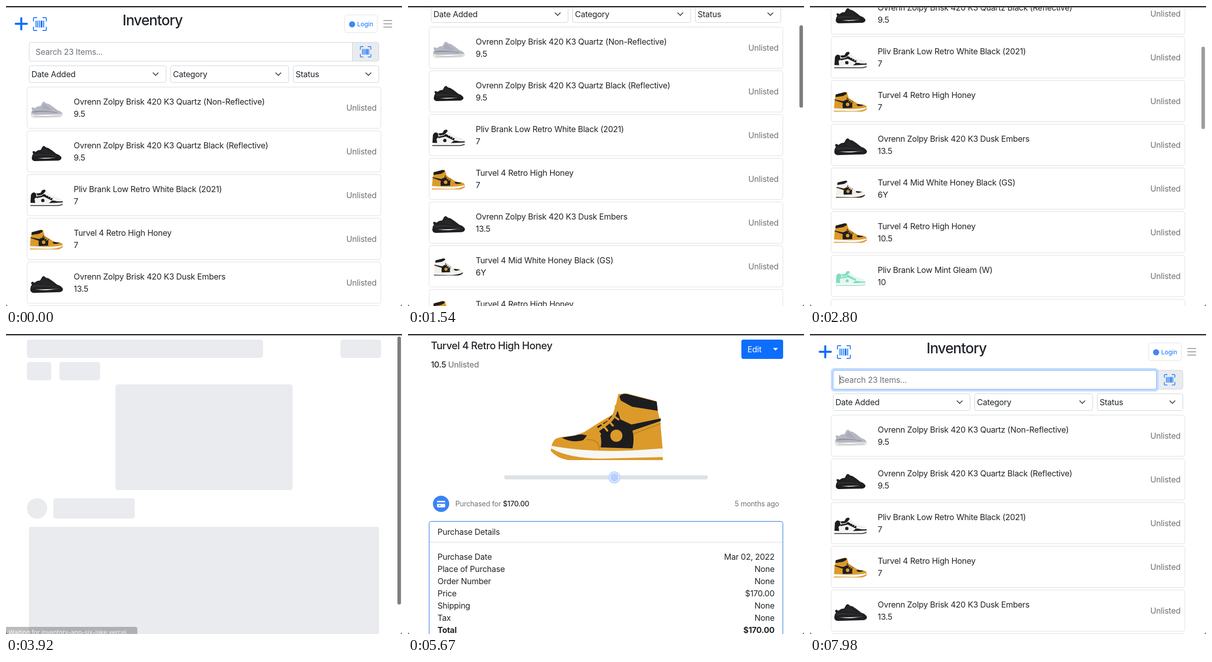
An HTML page for the animation above (8000 ms loop, 778 by 590 pixels).

```html
<!DOCTYPE html>
<html lang="en">
<head>
<meta charset="utf-8">
<title>Inventory</title>
<style>
html, body { margin: 0; width: 100%; height: 100%; overflow: hidden; background: #fff; }
svg { display: block; }
text { font: 400 16px Inter, "Liberation Sans", sans-serif; font-optical-sizing: none; letter-spacing: -.017em; fill: #212529; white-space: pre; }
.end { text-anchor: end; }
.gray { fill: #6f7378; }
.mid { font-weight: 500; }
.bold { font-weight: 700; }
.title { font-size: 28px; font-weight: 500; letter-spacing: -.035em; }
.head { font-size: 20px; font-weight: 500; letter-spacing: -.025em; }
.small { font-size: 14px; }
.tiny { font-size: 12px; letter-spacing: 0; }
.link { fill: #0d6efd; }
.white { fill: #fff; }
</style>
</head>
<body>
<svg id="stage" width="778" height="590" viewBox="0 0 778 590"></svg>
<script>
const LOOP = 8000, STEP = 70, BLUE = '#0d6efd';
const INK = '#1d1d20', GOLD = '#dc9a2a', MINT = '#7fdcc0';

const text = (x, y, s, cls = '') => `<text x="${x}" y="${y}" class="${cls}">${s}</text>`;
const box = (x, y, w, h, r, fill, stroke = 'none') =>
  `<rect x="${x}" y="${y}" width="${w}" height="${h}" rx="${r}" fill="${fill}" stroke="${stroke}"/>`;
const frame = (x, y, w, h, r, stroke, fill = '#fff') => box(x + .5, y + .5, w - 1, h - 1, r, fill, stroke);
const shape = (d, fill) => `<path d="${d}" fill="${fill}"/>`;
const line = (d, stroke, width) =>
  `<path d="${d}" fill="none" stroke="${stroke}" stroke-width="${width}" stroke-linecap="round" stroke-linejoin="round"/>`;
const place = (x, y, k, body) => `<g transform="translate(${x} ${y}) scale(${k})">${body}</g>`;

// Shoes, toe to the right. High is 222 x 132, low and runner are 200 wide.
const high = (main, collar, panel, sole, dot) =>
  shape('M88 2L71 1L13 16L10 35L5 56L0 114L171 119L221 107Q219 95 212 90Q205 86 176 84L156 77L129 60L99 42L93 24Z', main) +
  shape('M86 7Q80 0 71 2L12 17L10 35L61 27L83 15Z', collar) +
  shape('M97 40L89 36L84 52L62 62L4 50L4 55L60 74Q56 92 60 109L123 107Q119 88 130 66L112 56Z', panel) +
  shape('M150 84Q160 79 176 84L200 88Q180 99 158 93Z', panel) +
  line('M92 26Q92 46 110 60L150 88', main, 6) +
  line('M99 44L88 52M110 52L99 64M121 60L110 74M135 68L124 81M149 76L138 88', main, 4) +
  line('M3 60L58 80L61 108M150 92Q128 90 125 110', '#0003', 1.5) +
  `<circle cx="92" cy="84" r="12" fill="${dot}"/>` +
  shape('M0 109L60 113Q150 117 220 104L222 112Q205 126 188 130L0 130Z', '#f7f6f3') +
  shape('M0 126L120 129Q185 129 221 109L222 114Q210 128 188 132L0 132Z', sole);

const low = (base, over, outsole, dot) =>
  shape('M6 34Q10 20 24 17L46 24L64 20L74 4L88 0L98 10L134 38L164 48Q192 54 198 72L196 86L4 86Z', base) +
  shape('M6 34Q10 20 24 17L36 22L40 46L28 56L32 84L3 84Z', over) +
  shape('M38 24L64 21L74 4L88 0L96 8L84 22L72 32L46 36Z', over) +
  shape('M84 26L138 54L132 66L84 42L40 52L40 42L72 36Z', over) +
  shape('M112 84L134 66L150 68Q170 74 198 70L198 84Z', over) +
  line('M98 16L88 26M110 25L100 36M122 34L112 45M134 42L124 53', base, 4) +
  `<circle cx="78" cy="66" r="10" fill="${dot}"/>` +
  shape('M2 80Q100 86 199 78L198 94L170 98L2 98Z', '#f6f6f4') +
  line('M4 97L172 97L196 91', outsole, 5);

const runner = (main, shade, sole) =>
  shape('M6 82Q0 66 12 54L6 40L16 34L26 41L44 30L62 27L74 5L84 0L98 11L112 14L136 30L166 53Q192 60 199 78Z', main) +
  shape('M14 60Q70 50 134 62L166 66L160 70Q90 58 16 68Z', shade) +
  line('M82 18L100 26M74 28L112 38M72 38L126 50', shade, 3) +
  shape('M3 74Q60 90 120 84Q170 76 199 76Q203 92 180 98L20 102Q-2 98 3 74Z', sole) +
  line('M24 90Q110 96 184 87', shade, 2);

const pollen = high(GOLD, INK, INK, GOLD, GOLD);
const items = [
  ['Ovrenn Zolpy Brisk 420 K3 Quartz (Non-Reflective)', '9.5', place(48, 29, .32, runner('#b5b8c2', '#8f94a4', '#e6e5e3'))],
  ['Ovrenn Zolpy Brisk 420 K3 Quartz Black (Reflective)', '9.5', place(50, 30, .295, runner('#202022', '#303034', '#1b1b1d'))],
  ['Pliv Brank Low Retro White Black (2021)', '7', place(47, 30, .325, low('#f1f1ef', INK, INK, INK))],
  ['Turvel 4 Retro High Honey', '7', place(47, 23, .293, pollen)],
  ['Ovrenn Zolpy Brisk 420 K3 Dusk Embers', '13.5', place(47, 28, .325, runner('#222225', '#323236', '#1d1d20'))],
  ['Turvel 4 Mid White Honey Black (GS)', '6Y', place(51, 25, .257, high('#f2efe8', INK, INK, '#2b2926', GOLD))],
  ['Turvel 4 Retro High Honey', '10.5', place(47, 23, .293, pollen)],
  ['Pliv Brank Low Mint Gleam (W)', '10', place(50, 31, .295, low('#e4f7f1', MINT, MINT, MINT))]
];

const card = ([name, size, shoe], i) => `<g transform="translate(0 ${159 + 86 * i})">` +
  frame(41, 0, 696, 82, 4, '#dfdfdf') + shoe +
  text(133, 35, name) + text(133, 59, size) + text(728, 47, 'Unlisted', 'gray end') + '</g>';

const scanIcon = (x, y, k) => {
  const corner = [0, 90, 180, 270].map(a =>
    `<g transform="rotate(${a} 8 8)">${line('M.5 4.5V1.5a1 1 0 0 1 1-1h3', BLUE, 1)}</g>`).join('');
  const bars = [[3, 1], [5, 1], [7, 1], [9, 2], [12, 1]].map(([bx, w]) => box(bx, 4, w, 8, 0, BLUE)).join('');
  return place(x, y, k, corner + bars);
};

const select = (x, w, label, arrow) => frame(x, 117, w, 34, 4, '#ced4da') + text(x + 5, 140, label) +
  line(`M${arrow - 5} 131.5l5 5l5 -5`, '#343a40', 1.7);

const listPage = () =>
  line('M19 35H41M30 24V46', BLUE, 4) + scanIcon(53, 22, 1.6875) +
  text(229, 38, 'Inventory', 'title') +
  frame(665, 17, 65, 36, 5, '#dee2e6') + '<circle cx="680" cy="36" r="6" fill="#4285f4"/>' +
  text(690, 40, 'Login', 'tiny link') +
  line('M742 28.5H758M742 35H758M742 41.5H758', '#8a8a8a', 1.6) +
  frame(45, 71, 688, 38, 4, '#ced4da', '#e9ecef') + scanIcon(695.5, 79, 1.375) +
  '<path d="M49.5 71.5H680.5V108.5H49.5Q45.5 108.5 45.5 104.5V75.5Q45.5 71.5 49.5 71.5Z" fill="#fff" stroke="#ced4da"/>' +
  '<g id="focus"><rect x="43" y="69" width="640" height="42" rx="5" fill="none" stroke="#c2dbfe" stroke-width="4"/>' +
  frame(45, 71, 636, 38, 4, '#86b7fe', 'none') + '</g>' +
  text(58, 96, 'Search 23 Items...', 'gray') + '<path id="caret" d="M58.5 81V99" stroke="#212529"/>' +
  select(45, 270, 'Date Added', 294) + select(323, 233, 'Category', 535) + select(564, 169, 'Status', 712) +
  items.map(card).join('') + frame(41, 159 + 86 * items.length, 696, 82, 4, '#dfdfdf');

const skeleton = () => [
  [41, 11, 464, 36], [657, 11, 80, 36], [41, 55, 48, 36], [105, 55, 80, 36], [215, 99, 348, 208],
  [41, 323, 40, 40, 20], [93, 323, 160, 40], [45, 379, 688, 230]
].map(([x, y, w, h, r = 5]) => box(x, y, w, h, r, '#eaebef')).join('');

const rows = [['Purchase Date', 'Mar 02, 2022'], ['Place of Purchase', 'None'], ['Order Number', 'None'],
  ['Price', '$170.00'], ['Shipping', 'None'], ['Tax', 'None'], ['Total', '$170.00']];

const detailPage = () =>
  text(45, 30, 'Turvel 4 Retro High Honey', 'head') +
  box(655, 11, 82, 38, 4, BLUE) + text(667, 36, 'Edit', 'white') + shape('M717 27.5H727L722 32.5Z', '#fff') +
  text(45, 66, '10.5 <tspan fill="#7b7f84">Unlisted</tspan>', 'mid') +
  `<g id="shoe">${place(-111, 0, 1, pollen)}</g>` +
  box(189, 278, 400, 8, 4, '#dee2e6') +
  '<g id="thumb"><circle id="ring" r="12" fill="#c2dbfe"/><circle r="9" fill="#fff"/><circle id="knob" r="8"/></g>' +
  '<circle cx="65" cy="334" r="16" fill="#3b82f6"/>' +
  box(57, 328, 16, 13, 2, '#fff') + box(57, 331, 16, 3, 0, '#3b82f6') + box(60, 336.5, 4, 1.6, .5, '#3b82f6') +
  text(93, 339, 'Purchased for <tspan fill="#212529" font-weight="500">$170.00</tspan>', 'small gray') +
  text(729, 339, '5 months ago', 'small gray end') +
  frame(41, 368, 696, 260, 4, '#1c73dc') + text(58, 395, 'Purchase Details') +
  '<path d="M42 409.5H736" stroke="#dcdcdc"/>' +
  rows.map(([a, b], i) => {
    const cls = a === 'Total' ? 'bold' : '';
    return text(58, 444 + 24 * i, a, cls) + text(720, 444 + 24 * i, b, cls + ' end');
  }).join('');

const stage = document.getElementById('stage');
stage.innerHTML = box(0, 0, 778, 590, 0, '#fff') +
  `<g id="list">${listPage()}</g><g id="skeleton">${skeleton()}</g><g id="detail">${detailPage()}</g>` +
  '<rect id="bar" x="769" width="7" rx="3.5" fill="#7f7f7f"/>' +
  `<g id="status">${box(-5, 576, 263, 30, 4, '#67686b')}${text(5, 591, 'Waiting for inventory-app-six-lake.vercel....', 'tiny white')}</g>` +
  box(0, 0, 778, 2, 0, '#323135') + box(0, 2, 778, 1, 0, '#77767a') +
  shape('M0 586Q.5 589.5 4 590H0ZM778 586Q777.5 589.5 774 590H778Z', '#3a393d');

const el = {};
stage.querySelectorAll('[id]').forEach(n => el[n.id] = n);
const set = (id, attrs) => { for (const k in attrs) el[id].setAttribute(k, attrs[k]); };
const show = (id, on) => set(id, { display: on ? 'inline' : 'none' });
const ramp = (t, from, to) => Math.min(1, Math.max(0, (t - from) / (to - from)));

function scrollAt(t) {
  if (t < 1190 || t >= 7490) return 0;
  return Math.round(271 * (1 - Math.exp(-Math.pow((t - 1190) / 447.6, 2.267))));
}

function barOpacity(t) {
  if (t >= 3500) return t < 3990 ? 1 : 0;
  return t < 1260 ? 0 : Math.pow(1 - ramp(t, 2730, 3150), 1.5);
}

function render(now) {
  const t = Math.floor((now % LOOP) / STEP) * STEP;
  const loading = t >= 3500 && t < 4200, detail = t >= 4200 && t < 7490;
  const scroll = scrollAt(t);

  show('list', !loading && !detail);
  show('skeleton', loading);
  show('detail', detail);
  set('list', { transform: `translate(0 ${-scroll})` });
  set('focus', { opacity: ramp(t, 7700, 7910) });
  show('caret', t >= 7770);

  set('bar', { y: loading ? 5 : 5 + Math.round(.277 * scroll), height: loading ? 527 : 162, opacity: barOpacity(t) });
  set('status', { opacity: ramp(t, 3430, 3640) * (1 - .83 * ramp(t, 3780, 3990)) });
  show('status', t < 3990);

  // The slider turns the shoe in 36 views of ten degrees.
  const view = Math.floor(33 * ramp(t, 5250, 5950));
  const turn = Math.cos(view * Math.PI / 18);
  show('shoe', t >= 4340);
  set('shoe', { transform: `translate(390.5 116) scale(${Math.sign(turn) * (.45 + .55 * Math.abs(turn))} 1)` });
  set('thumb', { transform: `translate(${197 + view * 384 / 35} 282)` });
  show('ring', t >= 5250);
  const press = ramp(t, 5180, 5320) - ramp(t, 6230, 6440);
  const mix = (a, b) => Math.round(a + (b - a) * press);
  set('knob', { fill: `rgb(${mix(13, 182)},${mix(110, 206)},${mix(253, 254)})` });
}

function tick() {
  render(performance.now());
  requestAnimationFrame(tick);
}
tick();
</script>
</body>
</html>
```
